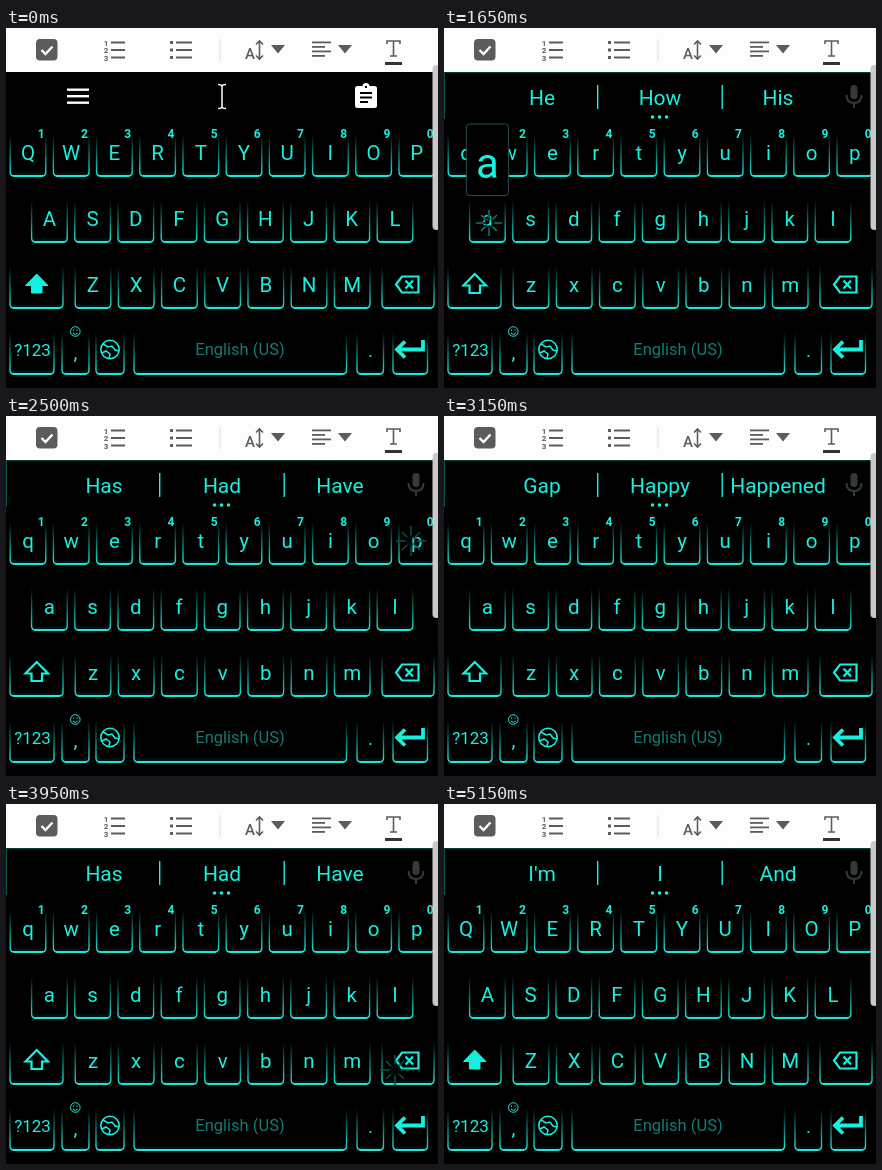
Recreate the animation shown at these times as an HTML page with a canvas. Size 432 px wide and 360 px high, loop 6200 ms.

```html
<!DOCTYPE html>
<html lang="en">
<head>
<meta charset="utf-8">
<title>Keyboard demo</title>
<style>
html, body { margin: 0; width: 100%; height: 100%; overflow: hidden; background: #000; }
canvas { display: block; width: 432px; height: 360px; }
</style>
</head>
<body>
<canvas id="stage" width="432" height="360"></canvas>
<script>
const ctx = document.getElementById('stage').getContext('2d');
const LOOP = 6200, TEAL = '#16f0df', GREY = '#5c5c5c';
const PITCH = 43.2;
const ROWS = [
  { letters: 'QWERTYUIOP', x: 22, y: 125 },
  { letters: 'ASDFGHJKL', x: 43.4, y: 190.5 },
  { letters: 'ZXCVBNM', x: 87, y: 256.5 }
];

// Each tap: key centre, finger position, press time and time of the resulting word change.
const TAPS = [
  { letter: 'H', x: 259.6, y: 190, px: 254, py: 202, down: 900, commit: 1250, words: ['He', 'How', 'His'] },
  { letter: 'a', x: 43.4, y: 190, px: 45, py: 195, down: 1450, commit: 1800, words: ['Has', 'Had', 'Have'] },
  { letter: 'p', x: 411, y: 125, px: 405, py: 125, down: 2200, commit: 2550, words: ['Gap', 'Happy', 'Happened'] },
  { x: 402, y: 256, px: 389, py: 266, down: 3650, commit: 3800, words: ['Has', 'Had', 'Have'] },
  { x: 402, y: 256, px: 389, py: 266, down: 4150, commit: 4300, words: ['He', 'How', 'His'] },
  { x: 402, y: 256, px: 389, py: 266, down: 4650, commit: 4800, words: ["I'm", 'I', 'And'], caps: true }
];

function text(str, x, y, size, color = TEAL, weight = 400) {
  ctx.font = `${weight} ${size}px Roboto, sans-serif`;
  ctx.textAlign = 'center';
  ctx.fillStyle = color;
  ctx.fillText(str, x, y);
}

function rect(x, y, w, h, color, radius = 0) {
  ctx.fillStyle = color;
  ctx.beginPath();
  ctx.roundRect(x, y, w, h, radius);
  ctx.fill();
}

function stroke(path, color, width = 2) {
  ctx.strokeStyle = color;
  ctx.lineWidth = width;
  ctx.stroke(new Path2D(path));
}

function fill(path, color) {
  ctx.fillStyle = color;
  ctx.fill(new Path2D(path));
}

function glow(alpha) {
  return `rgba(22,240,223,${alpha})`;
}

function fade(top, bottom, ...stops) {
  const g = ctx.createLinearGradient(0, top, 0, bottom);
  stops.forEach(([at, color]) => g.addColorStop(at, color));
  return g;
}

function key(left, right, bottom) {
  const top = bottom - 42;
  rect(left, bottom - 5, right - left, 5,
    fade(bottom - 5, bottom, [0, glow(0)], [1, glow(.15)]), [0, 0, 4, 4]);
  const edge = fade(top, bottom, [0, glow(0)], [.6, glow(.6)], [1, TEAL]);
  stroke(`M${left} ${top}V${bottom - 4}q0 4 4 4H${right - 4}q4 0 4 -4V${top}`, edge, 1.4);
  stroke(`M${left + 3} ${bottom}H${right - 3}`, TEAL, 1.8);
}

function toolbar() {
  rect(0, 0, 432, 44, '#fdfdfd');
  rect(30, 11, 21.5, 21.5, GREY, 4);
  stroke('M35.5 22l4 4L46.5 18.5', '#fff', 2.4);
  [14.5, 22, 29.5].forEach((y, i) => {
    text(i + 1, 100, y + 3, 8, GREY, 700);
    rect(105, y - 1, 14, 2, GREY);
    rect(164, y - 1.5, 3, 3, GREY);
    rect(170, y - 1, 16, 2, GREY);
  });
  rect(213.5, 11, 1, 22, '#ddd');
  text('A', 244, 31, 15, GREY, 500);
  stroke('M253.5 13V31M250 16.5l3.5-3.5l3.5 3.5M250 27.5l3.5 3.5l3.5-3.5', GREY, 1.6);
  fill('M265 17h14l-7 8.5zM332 17h14l-7 8.5z', GREY);
  [14.5, 19, 23.5, 28].forEach((y, i) => rect(306, y - 1, i % 2 ? 13 : 19, 1.8, GREY));
  stroke('M381 16V13H394V16M387.5 13V28M384 28h7', GREY, 1.6);
  rect(379, 34, 17, 3, '#333');
}

function menuRow() {
  [60.5, 67, 73.5].forEach(y => rect(61, y, 22, 2.4, '#fff'));
  stroke('M212 56.5q4 0 4 2q0 -2 4 -2M216 58V79M212 80.5q4 0 4 -2q0 2 4 2', '#fff', 1.5);
  rect(349, 58, 22, 22, '#fff', 2.5);
  ctx.beginPath();
  ctx.arc(360, 58.5, 3.5, 0, 7);
  ctx.fill();
  rect(359, 58, 2, 2, '#000');
  [[64, 12], [68.5, 12], [73, 8]].forEach(([y, w]) => rect(354, y, w, 2, '#000'));
}

function wordRow(words) {
  stroke('M0 44.7H427', glow(.3), 1);
  stroke('M.5 45V91', glow(.35), 1);
  words.forEach((word, i) => text(word, 98 + 118 * i, 77, 21));
  stroke('M153.7 57V81M278.2 57V81', TEAL, 1.4);
  [208.5, 215.5, 222.5].forEach(x => rect(x - 1.8, 87.2, 3.6, 3.6, TEAL, 1.8));
  rect(406.5, 57, 7, 14, '#343a3a', 3.5);
  stroke('M402.5 67q0 8 7.5 8t7.5-8M410 75V80', '#343a3a', 2);
}

function keyboard(caps) {
  ROWS.forEach(({ letters, x, y }, row) => [...letters].forEach((letter, i) => {
    const cx = x + PITCH * i;
    key(cx - 17.8, cx + 17.8, 148 + 66 * row);
    text(caps ? letter : letter.toLowerCase(), cx, y + 7, 20.5);
    if (!row) text((i + 1) % 10, cx + 13.3, 110, 12, TEAL, 700);
  }));

  [[4, 57, 280], [376, 428, 280], [4, 48, 346], [56, 83, 346], [90, 118, 346],
   [128, 340.5, 346], [351, 377.5, 346], [387, 421.5, 346]].forEach(box => key(...box));

  const arrow = 'M30.7 246L42 257.5H36V265H25.5V257.5H19.5Z';
  if (caps) fill(arrow, TEAL);
  stroke(arrow, TEAL, caps ? 1 : 2.2);

  stroke('M390 256.5L396 248.5H412.5V264.5H396ZM399.5 252.5l7.5 8M407 252.5l-7.5 8', TEAL, 2.2);
  text('?123', 26.5, 328, 17);
  text(',', 69.5, 331, 20);
  text('.', 364.5, 329, 19);
  text('English (US)', 234, 327, 16.5, '#117c74');

  stroke('M64.5 303.5a4.8 4.8 0 1 0 9.6 0a4.8 4.8 0 1 0 -9.6 0M66.8 305q2.5 3 5 0M67.5 301.4v1.2M71.1 301.4v1.2', TEAL, 1);
  stroke('M94.8 321.5a9.2 9.2 0 1 0 18.4 0a9.2 9.2 0 1 0 -18.4 0', TEAL, 1.6);
  stroke('M97 316l5 3l4-1l3 4l4 1M96 325l4-2l4 3l-1 4', TEAL, 1.5);
  stroke('M417 312V321.5H391M399 313.5L391 321.5L399 329.5', TEAL, 3.8);
}

function spark(x, y, age) {
  const reach = 9 + Math.min(age, 300) / 300 * 6;
  ctx.save();
  ctx.translate(x, y);
  ctx.globalAlpha = Math.max(0, Math.min(1, (400 - age) / 150));
  for (let i = 0; i < 8; i++) {
    ctx.rotate(Math.PI / 4);
    const end = i % 2 ? reach : reach * .85;
    stroke(`M3 0H${end}`, '#061c1a', 2.4);
    stroke(`M${reach * .4} 0H${end}`, '#248e84', 1);
  }
  ctx.restore();
}

function pressGlow({ letter, x, y }) {
  const half = letter ? 17 : 26;
  const top = y - 24, bottom = y + 23;
  rect(x - half, top, half * 2, bottom - top, fade(top, bottom,
    [0, glow(.25)], [.35, glow(.12)], [.6, glow(.25)], [.82, glow(.8)], [1, TEAL]), 4);
  ctx.strokeStyle = '#4c8580';
  ctx.lineWidth = 1;
  ctx.stroke();
}

function popup({ letter, x, y }, age) {
  const drop = Math.max(0, Math.min(1, (age - 120) / 80));
  const top = y - 101.5 + 7.5 * drop, bottom = y - 25.5 + 3 * drop;
  rect(x - 21, top, 42, bottom - top, '#000', 3);
  ctx.strokeStyle = '#274f4b';
  ctx.lineWidth = 1;
  ctx.stroke();
  text(letter, x, y - 47 + 6.5 * drop, 42);
}

function draw(t) {
  const last = TAPS.filter(tap => t >= tap.commit).pop();
  const caps = !last || !!last.caps;
  rect(0, 0, 432, 360, '#000');
  toolbar();
  if (last) wordRow(last.words); else menuRow();

  const tap = TAPS.find(({ down }) => t >= down && t < down + 400);
  const age = tap ? t - tap.down : 0;
  if (tap && age < 150) pressGlow(tap);
  keyboard(caps);
  if (tap) {
    if (age >= 50) spark(tap.px, tap.py, age);
    if (tap.letter && age < 250) popup(tap, age);
  }
  rect(426.5, 37, 8, 165, '#c9c9c9', 4);
}

const start = performance.now();
function tick() {
  const t = (performance.now() - start) % LOOP;
  draw(Math.floor(t / 50) * 50);
  requestAnimationFrame(tick);
}
tick();
</script>
</body>
</html>
```
